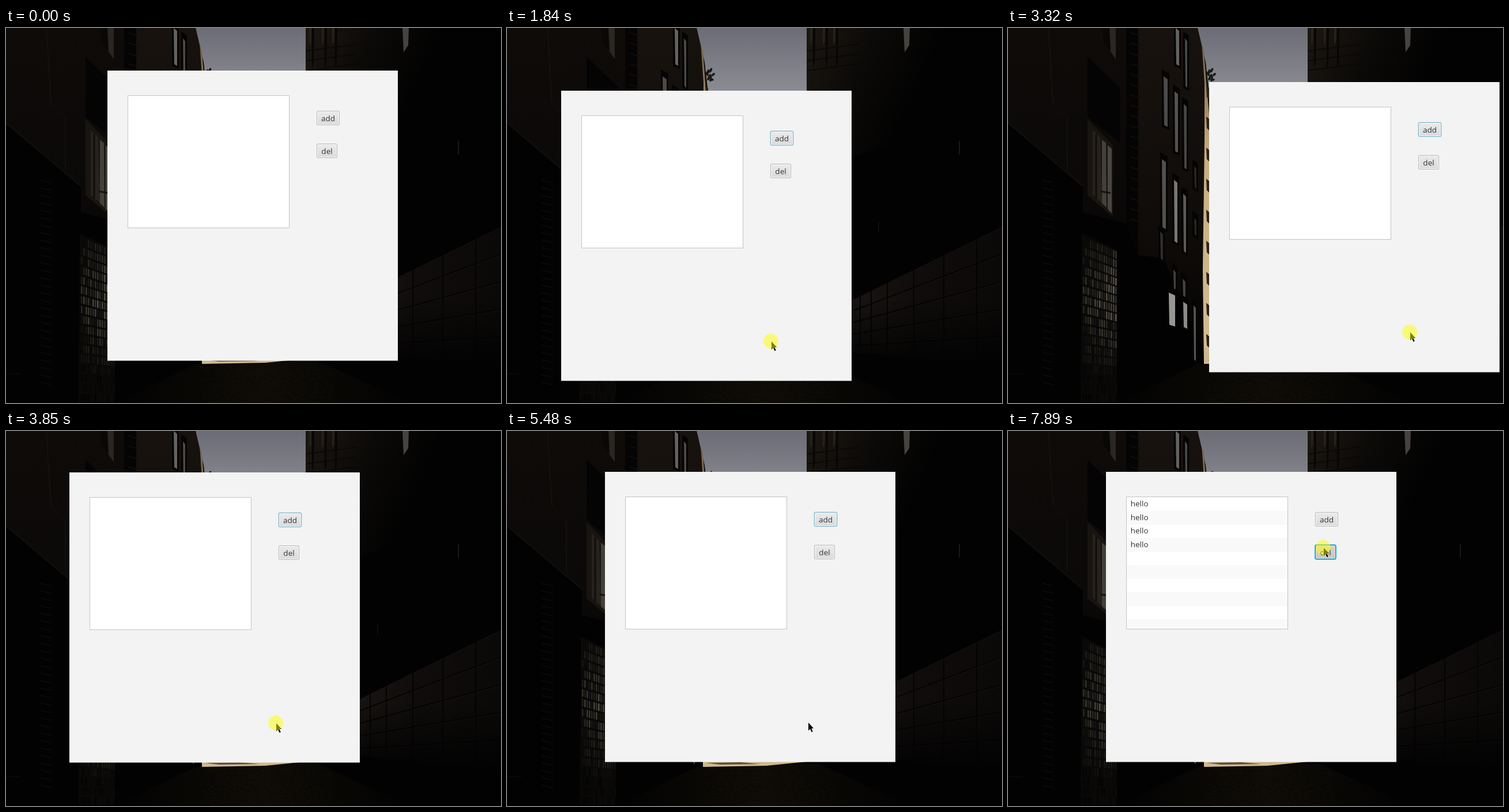
Write an HTML page with a canvas that moves like this. It is 859 px wide and 652 px high and loops after 8000 ms.

```html
<!DOCTYPE html>
<html lang="en">
<head>
<meta charset="utf-8">
<title>List demo</title>
<style>
  html, body { margin: 0; width: 100%; height: 100%; overflow: hidden; background: #000; }
  canvas { display: block; }
</style>
</head>
<body>
<canvas id="stage" width="859" height="652"></canvas>
<script>
const W = 859, H = 652, LOOP = 8000;
const ctx = document.getElementById('stage').getContext('2d');

// ---------- drawing helpers ----------
function poly(g, fill, ...p) {
  g.fillStyle = fill;
  g.beginPath();
  for (let i = 0; i < p.length; i += 2) g.lineTo(p[i], p[i + 1]);
  g.closePath();
  g.fill();
}
function line(g, color, width, x1, y1, x2, y2) {
  g.strokeStyle = color;
  g.lineWidth = width;
  g.beginPath();
  g.moveTo(x1, y1);
  g.lineTo(x2, y2);
  g.stroke();
}
function gradient(g, x1, y1, x2, y2, ...colors) {
  const fill = g.createLinearGradient(x1, y1, x2, y2);
  colors.forEach((c, i) => fill.addColorStop(i / (colors.length - 1), c));
  return fill;
}
function seeded(seed) {
  return () => (seed = (seed * 16807) % 2147483647) / 2147483647;
}

// ---------- dark alley backdrop ----------
function paintAlley() {
  const c = document.createElement('canvas');
  c.width = W;
  c.height = H;
  const g = c.getContext('2d');
  const rand = seeded(71);
  g.fillStyle = '#020202';
  g.fillRect(0, 0, W, H);

  // sky and right-hand building
  poly(g, gradient(g, 0, 0, 0, 110, '#6b6c76', '#8b8c93'), 329, 0, 521, 0, 521, 140, 352, 140, 343, 60);
  poly(g, gradient(g, 520, 0, 720, 90, '#1c1712', '#0c0a08', '#020202'), 520, 0, 760, 0, 700, 190, 520, 250);
  for (const x of [526, 548, 566]) {
    poly(g, '#27211a', x, 0, x + 4, 0, x + 3, 24, x, 30);
    poly(g, '#080605', x + 5, 0, x + 9, 0, x + 8, 60, x + 5, 70);
  }
  for (let y = 40; y < 90; y += 17) line(g, '#0a0807', 2, 521, y, 610, y - 12);
  poly(g, '#45423f', 688, 0, 699, 0, 698, 30, 690, 42);
  line(g, '#1a1817', 2, 785, 196, 785, 220);
  line(g, '#1a1817', 1, 645, 336, 645, 354);

  // left-hand building
  poly(g, gradient(g, 0, 0, 0, 560, '#0e0b09', '#0b0908', '#020202'), 0, 0, 205, 0, 205, 340, 130, 320, 130, 275, 0, 165);
  poly(g, gradient(g, 0, 0, 0, 600, '#17120e', '#110d0a', '#040303'), 225, 0, 329, 0, 343, 60, 349, 140, 349, 585, 270, 400, 225, 395);
  poly(g, '#050404', 205, 0, 226, 0, 226, 400, 205, 340);
  for (let y = 8; y < 350; y += 18) line(g, '#100d0b', 2, 212, y, 229, y + 5);
  line(g, '#15110e', 2, 70, 0, 78, 130);
  line(g, '#15110e', 1, 78, 130, 103, 155);
  line(g, '#12100d', 2, 103, 155, 103, 245);
  line(g, '#12100d', 2, 0, 165, 130, 275);
  poly(g, '#050404', 138, 50, 195, 105, 195, 200, 138, 155);

  // lit edge and foliage against the sky
  poly(g, gradient(g, 0, 40, 0, 585, '#75644d', '#c9ad80', '#ccb58a', '#d3bd94'),
    336, 25, 340, 40, 344, 95, 349, 150, 354, 585, 340, 585, 338, 420, 341, 200, 341, 95);
  for (let y = 100; y < 540; y += 54) poly(g, '#2b2119', 344, y, 349, y + 4, 349, y + 24, 345, y + 20);
  for (let i = 0; i < 11; i++) {
    g.fillStyle = '#1b1915';
    g.beginPath();
    g.ellipse(347 + rand() * 11, 70 + rand() * 24, 3.4, 2, rand() * 3, 0, 7);
    g.fill();
  }

  // tall window slits: x, width, top, bottom, grey level
  const slits = [
    [291, 6, 0, 66, 100], [307, 4, 18, 104, 76], [270, 7, 84, 172, 76], [289, 6, 110, 217, 84],
    [305, 5, 132, 246, 72], [267, 7, 228, 350, 82], [288, 6, 264, 374, 120], [304, 5, 288, 391, 92],
    [264, 5, 354, 404, 46], [287, 4, 420, 460, 66], [303, 5, 436, 474, 66], [279, 11, 460, 519, 152],
    [304, 7, 476, 523, 140], [322, 4, 482, 579, 86], [323, 4, 240, 280, 40], [323, 4, 330, 362, 40]
  ];
  for (const [x, w, top, bottom, v] of slits) {
    poly(g, '#050404', x - 3, top - 12, x + w + 3, top - 5, x + w + 3, bottom + 5, x - 3, bottom);
    poly(g, `rgb(${v},${v - 2},${v - 5})`, x, top, x + w, top + 5, x + w, bottom, x + 1, bottom - 3);
  }

  // windows above the grating
  poly(g, '#2a2621', 163, 0, 187, 0, 187, 54, 176, 38);
  poly(g, '#0a0807', 163, 0, 176, 0, 178, 40, 166, 25);
  poly(g, '#181410', 138, 158, 182, 204, 182, 328, 138, 291);
  poly(g, '#27221c', 147, 178, 160, 190, 163, 304, 147, 290);
  poly(g, '#433f39', 163, 194, 170, 200, 171, 312, 163, 305);
  poly(g, '#4a463f', 173, 204, 180, 210, 180, 322, 173, 315);
  line(g, '#100d0a', 3, 153, 184, 153, 296);
  line(g, '#171310', 3, 161, 284, 178, 287);

  // lit grating
  poly(g, '#090807', 128, 357, 189, 386, 189, 650, 126, 650);
  for (let row = 0; row < 17; row++) {
    for (let col = 0; col < 15; col++) {
      const x = 130 + col * 4, y = 364 + row * 17 + col * (1.7 - row * 0.1);
      const glow = Math.max(0.12, 1 - Math.abs(y - 465) / 155) * (0.5 + col / 28);
      const v = (28 + rand() * 92) * glow;
      g.fillStyle = `rgb(${v},${v * 0.94},${v * 0.8})`;
      g.fillRect(x, y, 2.6, 13);
    }
  }
  for (let y = 265; y < 620; y += 13) {
    line(g, '#0c0a09', 2, 60, y, 78, y + 4);
    line(g, '#080706', 1, 79, y, 79, y + 12);
  }

  // brick wall on the right
  const wallTop = x => 480 - (x - 582) * 0.487;
  poly(g, gradient(g, 570, 0, W, 0, '#1b1714', '#0f0c0b', '#0b0908'), 560, 491, W, 345, W, 590, 560, 560);
  for (let i = 0; i < 6; i++) {
    const left = 491 + i * 16, right = 345 + i * 48;
    line(g, '#040303', 2, 560, left, W, right);
    line(g, '#15110f', 1, 560, left + 2, W, right + 2);
  }
  for (const x of [584, 597, 613, 632, 660, 706, 758, 815]) line(g, '#040303', 2, x, wallTop(x), x, 580);
  poly(g, gradient(g, 0, 470, 0, 590, 'rgba(2,2,2,0)', '#020202'), 560, 470, W, 470, W, 600, 560, 600);

  // pavement
  poly(g, gradient(g, 190, 0, 700, 0, '#020202', '#0f0c07', '#020202'), 330, 584, 540, 578, 700, 652, 190, 652);
  for (let y = 590; y < 652; y += 4) {
    for (let x = 340; x < 560; x += 7) {
      g.fillStyle = rand() > 0.5 ? '#120e08' : '#080604';
      g.fillRect(x + (y % 8), y, 4, 1);
    }
  }
  poly(g, '#cdb98e', 340, 555, 530, 555, 530, 574, 450, 582, 340, 584);
  poly(g, '#5e4d35', 345, 577, 405, 576, 440, 579, 370, 580);
  line(g, '#100e0c', 1, 0, 601, 25, 601);
  return c;
}
const alley = paintAlley();

// ---------- timing ----------
// Screen updates come in bursts: first update, last update, count.
const bursts = [
  [140, 600, 7], [850, 1610, 11], [1690, 2460, 11], [2540, 2690, 3], [2840, 3150, 5],
  [3320, 3620, 5], [3850, 4080, 4], [4240, 4630, 6], [4940, 5480, 8], [5630, 6100, 7],
  [6500, 6880, 6], [7030, 7030, 1], [7200, 7430, 4], [7580, 7660, 2], [7890, 7890, 1]
];
function lastUpdate(t) {
  let q = 0;
  for (const [start, end, count] of bursts) {
    if (t < start) break;
    const gap = (end - start) / (count - 1) || 1;
    q = start + Math.min(count - 1, Math.floor((t - start + 5) / gap)) * gap;
  }
  return q;
}

// Smooth path through [time, x, y] keys that never overshoots them.
function pathAt(keys, t) {
  const last = keys.length - 1;
  if (t <= keys[0][0]) return keys[0].slice(1);
  if (t >= keys[last][0]) return keys[last].slice(1);
  const i = keys.findIndex(k => k[0] > t) - 1;
  const span = keys[i + 1][0] - keys[i][0], u = (t - keys[i][0]) / span;
  return [1, 2].map(axis => {
    const slope = j => (keys[j + 1][axis] - keys[j][axis]) / (keys[j + 1][0] - keys[j][0]);
    const tangent = j => {
      if (j === 0 || j === last) return 0;
      const a = slope(j - 1), b = slope(j);
      return a * b > 0 ? 2 * a * b / (a + b) : 0;
    };
    const a = keys[i][axis], b = keys[i + 1][axis], ease = u * u * (3 - 2 * u);
    return a + (b - a) * ease
      + span * u * (1 - u) * ((1 - u) * tangent(i) - u * tangent(i + 1));
  });
}

const dragPath = [
  [850, 176, 74], [1154, 279, 68], [1382, 233, 82], [1610, 47, 110], [1690, 45, 110],
  [2230, 295, 104], [2383, 211, 98], [2460, 85, 99], [2540, 70, 99], [2690, 60, 98],
  [2840, 80, 100], [3000, 220, 102], [3150, 353, 97], [3320, 349, 94], [3620, 92, 73],
  [3850, 110, 72], [4080, 287, 57], [4240, 270, 59], [4396, 77, 77], [4630, 45, 79],
  [4940, 50, 85], [5250, 110, 103], [5480, 170, 71]
];
const arrivePath = [[140, 724, 640], [600, 529, 511]];
const clickPath = [
  [5480, 523, 507], [5630, 532, 495], [5860, 628, 270], [6020, 585, 128], [6100, 552, 155],
  [7120, 552, 155], [7430, 548, 198], [7580, 548, 200], [7660, 548, 203]
];
const GRAB_X = 353, GRAB_Y = 436, WINDOW_LAG = 20;

function cursorAt(q) {
  if (q < 850) return pathAt(arrivePath, q);
  if (q > 5481) return pathAt(clickPath, q);
  const [x, y] = pathAt(dragPath, q + WINDOW_LAG);
  return [x + GRAB_X, y + GRAB_Y];
}

const between = (q, a, b) => q >= a && q < b;
const addedAt = [6570, 6720, 6800, 7030];
const addPresses = [[6500, 6570], [6650, 6800], [6875, 7030]];

// ---------- interface ----------
function label(text, x, y, align = 'left') {
  ctx.font = '13.5px "Open Sans", "Noto Sans", sans-serif';
  ctx.textAlign = align;
  ctx.fillStyle = '#333';
  ctx.fillText(text, x, y);
}
function box(x, y, w, h, r, fill) {
  ctx.fillStyle = fill;
  ctx.beginPath();
  ctx.roundRect(x, y, w, h, r);
  ctx.fill();
}
function button(text, y, w, focused, pressed) {
  const x = 363;
  const border = !focused ? '#b5b5b5' : pressed ? '#039ed3' : '#7fb4cb';
  if (focused) box(x - 1, y - 1, w + 2, 27, 4, pressed ? '#45b3da' : '#cfe2ea');
  box(x, y, w, 25, 3, border);
  box(x + 1, y + 1, w - 2, 23, 2, pressed ? '#e0e0e0' : '#fafafa');
  box(x + 2, y + 2, w - 4, 21, 1, pressed
    ? gradient(ctx, 0, y, 0, y + 25, '#d4d4d4', '#c6c6c6')
    : gradient(ctx, 0, y, 0, y + 25, '#ebebeb', '#dadada'));
  label(text, x + w / 2, y + 17.5, 'center');
}
function list(count) {
  ctx.fillStyle = '#c4c4c4';
  ctx.fillRect(35, 43, 281, 231);
  ctx.fillStyle = '#fff';
  ctx.fillRect(36, 44, 279, 229);
  if (!count) return;
  ctx.fillStyle = '#f9f9f9';
  for (let row = 1; row < 10; row += 2) {
    const top = Math.round(44 + row * 23.5);
    ctx.fillRect(36, top, 279, Math.min(24, 273 - top));
  }
  for (let row = 0; row < count; row++) label('hello', 42.7, Math.round(60.4 + row * 23.5));
}
function pointer(x, y, down) {
  ctx.save();
  ctx.translate(x, y);
  ctx.beginPath();
  for (const [px, py] of [[0, 0], [0, 14], [3, 11], [5.5, 16.5], [7.8, 15.5], [5.3, 10.3], [9, 10]]) ctx.lineTo(px, py);
  ctx.closePath();
  ctx.strokeStyle = '#fff';
  ctx.lineWidth = 1;
  ctx.stroke();
  ctx.fillStyle = '#000';
  ctx.fill();
  if (down) box(-14, -13.5, 26, 26, 13, 'rgba(255,255,0,.5)');
  ctx.restore();
}

function draw(t) {
  const q = lastUpdate(t);
  const adding = addPresses.some(([a, b]) => between(q, a, b));
  const deleting = q >= 7890;
  const dragging = between(q, 850, 5479);
  const [left, top] = pathAt(dragPath, q).map(Math.round);

  ctx.drawImage(alley, 0, 0);
  ctx.save();
  ctx.translate(left, top);
  ctx.fillStyle = '#f3f3f3';
  ctx.fillRect(0, 0, 504, 504.5);
  list(addedAt.filter(time => q >= time).length);
  button('add', 70, 40, between(q, 850, 7890), adding);
  button('del', 127, 36, deleting, deleting);
  ctx.restore();

  if (q >= 140) {
    const [x, y] = cursorAt(q).map(Math.round);
    pointer(x, y, dragging || adding || deleting);
  }
}
function tick() {
  draw(performance.now() % LOOP);
  requestAnimationFrame(tick);
}
tick();
</script>
</body>
</html>
```
